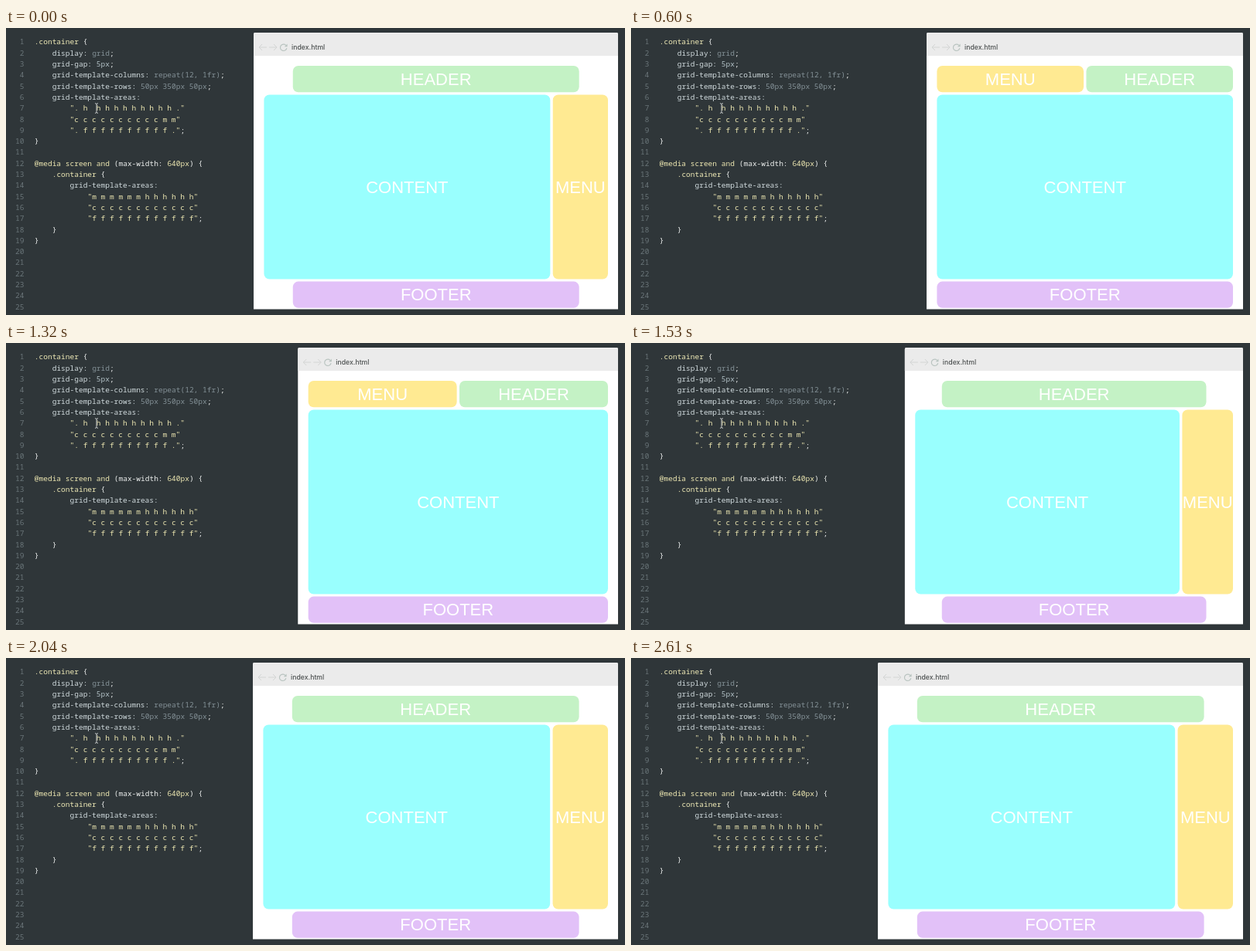
An HTML page with a canvas that plays this animation: 800 by 372 pixels, repeating every 2640 ms.

```html
<!DOCTYPE html>
<html lang="en">
<head>
<meta charset="utf-8">
<title>Responsive grid areas</title>
<style>
html, body { margin: 0; width: 100%; height: 100%; overflow: hidden; background: #2f3639; }
canvas { display: block; width: 800px; height: 372px; }
</style>
</head>
<body>
<canvas id="stage"></canvas>
<script>
const LOOP = 2640;
const canvas = document.getElementById('stage');
const ctx = canvas.getContext('2d');
const ratio = window.devicePixelRatio || 1;
canvas.width = 800 * ratio;
canvas.height = 372 * ratio;

const INK = { s: '#f1ecb8', w: '#eef0ef', p: '#d0dadd', v: '#849197', n: '#b3c2c7', y: '#eee8b2' };
const CODE_FONT = '9.53px "Noto Sans Mono", "DejaVu Sans Mono", monospace';
const CHAR = 5.72;
const LINE = 14.3;

// Each line: indent, then pairs of ink key and text.
const repeat = (letter, count) => Array(count).fill(letter).join(' ');
const CODE = [
  [0, 's', '.container', 'w', ' {'],
  [4, 'p', 'display:', 'v', ' grid', 'w', ';'],
  [4, 'p', 'grid-gap:', 'n', ' 5px', 'w', ';'],
  [4, 'p', 'grid-template-columns:', 'v', ' repeat(12, 1fr)', 'w', ';'],
  [4, 'p', 'grid-template-rows:', 'v', ' 50px 350px 50px', 'w', ';'],
  [4, 'p', 'grid-template-areas:'],
  [8, 'y', `". h  ${repeat('h', 9)} ."`],
  [8, 'y', `"${repeat('c', 10)} m m"`],
  [8, 'y', `". ${repeat('f', 10)} ."`, 'w', ';'],
  [0, 'w', '}'],
  [0],
  [0, 'y', '@media screen and', 'w', ' (max-width: ', 'y', '640px', 'w', ') {'],
  [4, 's', '.container', 'w', ' {'],
  [8, 'p', 'grid-template-areas:'],
  [12, 'y', `"${repeat('m', 6)} ${repeat('h', 6)}"`],
  [12, 'y', `"${repeat('c', 12)}"`],
  [12, 'y', `"${repeat('f', 12)}"`, 'w', ';'],
  [4, 'w', '}'],
  [0, 'w', '}']
];

// Left window edge: time, position, velocity (px/ms)
const DRAG = [
  [0, 320, 0.03],
  [360, 350, 0.13],
  [590, 382, 0],
  [1200, 382, 0],
  [1530, 354, -0.135],
  [1910, 319, 0],
  [2610, 319, 0],
  [2640, 320, 0.03]
];

function edgeAt(t) {
  const i = DRAG.findIndex(key => key[0] > t);
  const [t0, x0, v0] = DRAG[i - 1];
  const [t1, x1, v1] = DRAG[i];
  const d = t1 - t0, u = (t - t0) / d, r = 1 - u;
  return r * r * ((1 + 2 * u) * x0 + u * d * v0) + u * u * ((3 - 2 * u) * x1 - r * d * v1);
}

function text(str, x, y, color, font, align = 'left') {
  ctx.font = font;
  ctx.fillStyle = color;
  ctx.textAlign = align;
  ctx.fillText(str, x, y);
}

function stroke(color, width, path) {
  ctx.strokeStyle = color;
  ctx.lineWidth = width;
  ctx.beginPath();
  path();
  ctx.stroke();
}

function line(...points) {
  points.forEach(([x, y], i) => i ? ctx.lineTo(x, y) : ctx.moveTo(x, y));
}

function drawEditor() {
  ctx.fillStyle = '#2f3639';
  ctx.fillRect(0, 0, 800, 372);
  for (let i = 0; i < 25; i++) {
    const y = 21.4 + i * LINE;
    text(i + 1, 23.5, y, '#6a7579', CODE_FONT, 'right');
    const [indent, ...runs] = CODE[i] || [0];
    let column = indent;
    for (let k = 0; k < runs.length; k += 2) {
      text(runs[k + 1], 36.8 + column * CHAR, y, INK[runs[k]], CODE_FONT);
      column += runs[k + 1].length;
    }
  }
  stroke('#d5d8d8', 0.9, () => {
    line([115, 97.5], [117, 98.5], [119, 97.5]);
    line([117, 98.5], [117, 109.5]);
    line([115, 110.5], [117, 109.5], [119, 110.5]);
  });
}

function drawWindow(x) {
  ctx.fillStyle = '#fff';
  ctx.beginPath();
  ctx.roundRect(x, 6, 791 - x, 358.5, [2, 2, 0, 0]);
  ctx.fill();
  ctx.fillStyle = '#ebebeb';
  ctx.beginPath();
  ctx.roundRect(x, 6, 791 - x, 30, [2, 2, 0, 0]);
  ctx.fill();

  stroke('#d3d5d4', 1, () => {
    line([x + 17, 25], [x + 7, 25]);
    line([x + 11, 21], [x + 7, 25], [x + 11, 29]);
    line([x + 20, 25], [x + 30, 25]);
    line([x + 26, 21], [x + 30, 25], [x + 26, 29]);
  });
  stroke('#b9c4c0', 1.2, () => ctx.arc(x + 38.7, 25.3, 4.2, 0.2, 5.5));
  ctx.fillStyle = '#b9c4c0';
  ctx.beginPath();
  line([x + 43.6, 20.5], [x + 43.6, 24.3], [x + 39.8, 24.3]);
  ctx.fill();
  text('index.html', x + 49, 27.7, '#4c5050', '500 8.7px Inter, sans-serif');
}

function drawGrid(x) {
  const left = x + 13.4, gap = 3.4;
  const column = (778 - left - 11 * gap) / 12;
  const rows = { top: [49, 34.3], middle: [86.5, 239], bottom: [328.6, 34.2] };

  function area(label, color, start, span, row) {
    const [y, height] = rows[row];
    const ax = left + start * (column + gap);
    const width = span * (column + gap) - gap;
    ctx.fillStyle = color;
    ctx.beginPath();
    ctx.roundRect(ax, y, width, height, 7);
    ctx.fill();
    text(label, ax + width / 2, y + height / 2 + 7.7, '#fff',
      '22px "Liberation Sans", Arial, sans-serif', 'center');
  }

  const narrow = x > 354.6;
  area('HEADER', '#c4f2c5', narrow ? 6 : 1, narrow ? 6 : 10, 'top');
  area('CONTENT', '#99fffe', 0, narrow ? 12 : 10, 'middle');
  area('MENU', '#ffea92', narrow ? 0 : 10, narrow ? 6 : 2, narrow ? 'top' : 'middle');
  area('FOOTER', '#e2c1f8', narrow ? 0 : 1, narrow ? 12 : 10, 'bottom');
}

function render(now) {
  const x = edgeAt(now % LOOP);
  ctx.setTransform(ratio, 0, 0, ratio, 0, 0);
  drawEditor();
  drawWindow(x);
  drawGrid(x);
}

const startTime = performance.now();
function tick() {
  render(performance.now() - startTime);
  requestAnimationFrame(tick);
}
tick();
</script>
</body>
</html>
```
